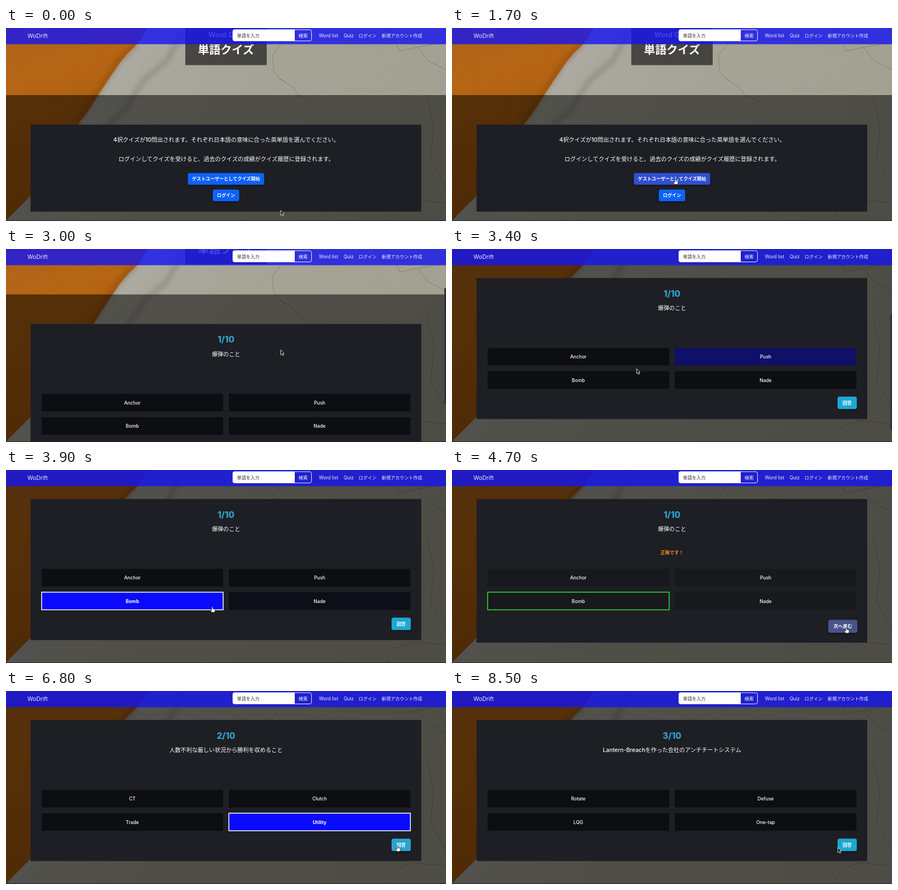
An HTML page that plays this animation: 800x351 px, repeating every 8600 ms.

```html
<!DOCTYPE html>
<html lang="ja">
<head>
<meta charset="utf-8">
<title>単語クイズ</title>
<style>
html, body { margin: 0; width: 100%; height: 100%; overflow: hidden; background: #1e1f24; }
svg { display: block; width: 800px; height: 351px; }
text { font-family: Inter, "Noto Sans CJK JP", "Noto Sans CJK", sans-serif; fill: #fff; white-space: pre; }
</style>
</head>
<body>
<svg id="stage" viewBox="0 0 800 351">
  <defs>
    <linearGradient id="stone" x1="0" y1="0" x2="1" y2="0.3">
      <stop offset="0.2" stop-color="#aeaca5"/>
      <stop offset="0.55" stop-color="#a6a496"/>
      <stop offset="1" stop-color="#a2a091"/>
    </linearGradient>
    <linearGradient id="clay" x1="0" y1="0" x2="0.25" y2="1">
      <stop offset="0" stop-color="#b0641c"/>
      <stop offset="0.3" stop-color="#b56513"/>
      <stop offset="1" stop-color="#a4580c"/>
    </linearGradient>
    <filter id="shadow" x="-20%" y="-40%" width="140%" height="200%">
      <feDropShadow dx="0" dy="2" stdDeviation="2" flood-opacity="0.35"/>
    </filter>
    <filter id="soft" x="-20%" y="-20%" width="140%" height="140%">
      <feGaussianBlur stdDeviation="5"/>
    </filter>
  </defs>

  <g id="wall">
    <rect width="800" height="351" fill="url(#stone)"/>
    <path d="M325 0L292 60 250 95 215 150 180 180" fill="none" stroke="#77756c" stroke-width="9" opacity="0.45" filter="url(#soft)"/>
    <path d="M258 0L240 28 222 45 208 62 190 88 172 115 150 150 130 176 45 305 22 328 5 345 0 351V0Z" fill="url(#clay)"/>
    <path d="M236 28L203 62 168 115 126 176" fill="none" stroke="#7a3d08" stroke-width="7" opacity="0.5" filter="url(#soft)"/>
    <g fill="none" stroke="#6f6d62" stroke-width="0.8" opacity="0.75">
      <path d="M512 0L500 30 484 50 487 78 498 92 522 108 531 121 560 135M497 92L508 99"/>
      <path d="M800 26L776 30 748 35 716 42 705 20 690 0M748 35L768 60 800 76"/>
      <path d="M690 351L708 325 740 312 800 318M765 122L778 180 772 240 800 290"/>
    </g>
  </g>

  <g id="page">
    <rect y="122" width="800" height="500" opacity="0.52"/>
    <rect x="326" y="-20" width="148" height="87.5" opacity="0.58"/>
    <g id="heading"></g>
    <g id="intro"></g>
    <g id="quiz" transform="translate(0 123)"></g>
  </g>

  <rect width="800" height="29.5" fill="rgb(20,20,240)" opacity="0.8"/>
  <g id="nav"></g>
  <rect id="scrollbar" x="797" width="3" height="211" rx="1.5" fill="#303030"/>
  <rect y="350" width="800" height="1" fill="#26262a"/>

  <g id="cursor">
    <path id="arrow" d="M0 0V9L2.1 7.1 3.6 10.3 5.2 9.6 3.8 6.5H6.4Z" fill="#111" stroke="#fff" stroke-width="0.8"/>
    <path id="hand" d="M-1 0.3Q0 -0.7 1 0.3V3.2L2.6 3.5 4.2 4 5 4.8V7.3L4 9.8H-1.2L-3.4 6.2Q-3.6 5 -2.4 5.2L-1 6.2Z" fill="#fff" stroke="#111" stroke-width="0.7"/>
  </g>
</svg>
<script>
const $ = id => document.getElementById(id);
const LOOP = 8600, SCROLL = 123;

function add(parent, tag, attrs) {
  const el = document.createElementNS($("stage").namespaceURI, tag);
  for (const key in attrs) el.setAttribute(key, attrs[key]);
  return parent.appendChild(el);
}
function set(el, attrs) {
  for (const key in attrs) el.setAttribute(key, attrs[key]);
}
function label(parent, str, x, middle, size, attrs = {}) {
  const el = add(parent, "text", {
    x, y: middle + size * 0.36, "font-size": size, "text-anchor": "middle", ...attrs
  });
  el.textContent = str;
  return el;
}
function button(parent, str, x, y, width, height, fill, size = 8.3) {
  const group = add(parent, "g", {});
  const rect = add(group, "rect", { x, y, width, height, rx: 3.5, fill, filter: "url(#shadow)" });
  label(group, str, x + width / 2, y + height / 2, size, { "font-weight": 600 });
  return { group, rect };
}

// Heading and navigation
label($("heading"), "Word Quiz", 400, 12, 12.8, { "font-weight": 600 });
label($("heading"), "単語クイズ", 400, 39.8, 20.6, { "font-weight": 700 });

const nav = $("nav");
const left = { "text-anchor": "start" };
const link = { ...left, style: "fill:#ececff" };
label(nav, "WoDrift", 39, 14.5, 10.4, link);
add(nav, "path", { d: "M525 2.6H416Q412 2.6 412 6.6V20Q412 24 416 24H525Z", fill: "#fff" });
add(nav, "path", {
  d: "M525 3.1H552Q555.5 3.1 555.5 6.6V20Q555.5 23.5 552 23.5H525", fill: "none", stroke: "#fff", "stroke-width": 0.9
});
label(nav, "単語を入力", 420, 13.6, 8.2, { ...left, style: "fill:#333" });
label(nav, "検索", 540.3, 13.6, 8.2);
label(nav, "Word list", 569, 14.3, 8.5, link);
label(nav, "Quiz", 614, 14.3, 8.5, link);
label(nav, "ログイン", 641, 14.3, 8.2, link);
label(nav, "新規アカウント作成", 683, 14.3, 8.2, link);

// Start page
const PANEL = "#1e1f24";
const intro = $("intro");
const body = { "font-weight": 500 };
add(intro, "rect", { x: 44.6, y: 175.7, width: 710.4, height: 158.3, fill: PANEL });
label(intro, "4択クイズが10問出されます。それぞれ日本語の意味に合った英単語を選んでください。", 400.5, 203, 10.4, body);
label(intro, "ログインしてクイズを受けると、過去のクイズの成績がクイズ履歴に登録されます。", 400.5, 238, 10.4, body);
const guest = button(intro, "ゲストユーザーとしてクイズ開始", 330.7, 263.7, 138.6, 21.3, "#0f62fe");
button(intro, "ログイン", 376, 293.8, 48, 21.3, "#0f62fe");

// Quiz page
const quiz = $("quiz");
const panel = add(quiz, "rect", { x: 44.6, y: 52.7, width: 710.4, fill: PANEL });
const counter = label(quiz, "", 400, 81, 15.5, { "font-weight": 800, style: "fill:#2ea3cf" });
const prompt = label(quiz, "", 400, 107.5, 10.3, { "font-weight": 500 });
const verdict = label(quiz, "", 400, 150, 8.3, { "font-weight": 700, style: "fill:#ff8a1c" });
const choices = [0, 1, 2, 3].map(i => {
  const x = i % 2 ? 404.5 : 64, y = i < 2 ? 179 : 221.5;
  return {
    rect: add(quiz, "rect", { x: x + 0.75, y: y + 0.75, width: 330, height: 32 }),
    text: label(quiz, "", x + 165.7, y + 17.2, 8.6)
  };
});
const answer = button(quiz, "回答", 701, 268.5, 35, 22.5, "#1ea8d4");
const next = button(quiz, "次へ進む", 684, 272.5, 53, 23.5, "#6c757d", 8.5);

const questions = [
  { start: 2100, pick: 2, picked: 3700, answered: 4250, correct: 2, verdict: "正解です！",
    prompt: "爆弾のこと", words: ["Anchor", "Push", "Bomb", "Nade"],
    hovers: [[1, 3050, 3250], [2, 3480, 3750], [3, 3890, 4080]] },
  { start: 5000, pick: 3, picked: 6350, answered: 6950, correct: 1, verdict: "不正解です！",
    prompt: "人数不利な厳しい状況から勝利を収めること", words: ["CT", "Clutch", "Trade", "Utility"],
    hovers: [[3, 6000, 6400]] },
  { start: 8250, pick: -1, picked: LOOP, answered: LOOP, correct: -1, verdict: "",
    prompt: "Lantern-Breachを作った会社のアンチチートシステム", words: ["Rotate", "Defuse", "LQG", "One-tap"],
    hovers: [] }
];

const pointerPath = [
  [0, 499.3, 331.5], [500, 499.3, 331.5], [1400, 406, 274.8], [2100, 406, 274.8], [2600, 499.5, 183.5],
  [3200, 499.5, 183.5], [3400, 335.7, 217.7], [3600, 262, 238], [3780, 262, 238], [4150, 713, 282],
  [4350, 713, 282], [4600, 717, 287], [5300, 717, 287], [6000, 580, 239], [6400, 580, 239],
  [6700, 712, 282], [7200, 712, 282], [7600, 716, 287], [8250, 716, 287], [8450, 701.5, 284.7], [LOOP, 701.5, 284.7]
];
const handTimes = [[1300, 2150], [3080, 3270], [3480, 5050], [5900, 8300]];

const clamp = v => Math.min(1, Math.max(0, v));
const smooth = v => (v = clamp(v), v * v * (3 - 2 * v));
const within = (t, from, to) => t >= from && t < to;
const pulse = (t, on, off, fade = 300) => clamp((t - on) / fade) * clamp(1 - (t - off) / fade);
const mix = (a, b, k) => `rgb(${a.map((v, i) => Math.round(v + (b[i] - v) * k))})`;
const show = (el, visible) => el.setAttribute("visibility", visible ? "visible" : "hidden");

function drawQuiz(t) {
  const index = questions.findLastIndex(q => t >= q.start);
  show(intro, index < 0);
  quiz.style.display = index < 0 ? "none" : "";
  if (index < 0) return;
  const q = questions[index];
  const done = t >= q.answered;
  set(panel, { height: done ? 261.3 : 256.6 });
  counter.textContent = `${index + 1}/10`;
  prompt.textContent = q.prompt;
  verdict.textContent = done ? q.verdict : "";
  choices.forEach(({ rect, text }, i) => {
    const selected = !done && i === q.pick && t >= q.picked;
    const hover = q.hovers.reduce((k, [c, on, off]) => c === i ? Math.max(k, pulse(t, on, off)) : k, 0);
    const right = done && i === q.correct;
    set(rect, {
      fill: done ? "#18191c" : selected ? "#0a0aff" : mix([13, 14, 17], [18, 18, 190], hover),
      stroke: right ? "#2be32b" : selected ? "#fff" : "none",
      "stroke-width": 1.5
    });
    text.textContent = q.words[i];
    set(text, { "font-weight": selected ? 700 : 500 });
  });
  show(answer.group, !done);
  show(next.group, done);
  const overAnswer = Math.max(pulse(t, 4100, 4300), pulse(t, 6640, 7000));
  set(answer.rect, { fill: mix([30, 168, 212], [56, 158, 200], overAnswer) });
  set(next.rect, { fill: mix([108, 117, 125], [72, 82, 138], clamp((t - q.answered) / 300)) });
}

function drawPointer(t) {
  const i = pointerPath.findLastIndex(p => t >= p[0]);
  const a = pointerPath[i], b = pointerPath[i + 1] || a;
  const k = smooth((t - a[0]) / (b[0] - a[0] || 1));
  set($("cursor"), { transform: `translate(${a[1] + (b[1] - a[1]) * k} ${a[2] + (b[2] - a[2]) * k})` });
  const hand = handTimes.some(([from, to]) => within(t, from, to)) && !within(t, 3780, 3880);
  show($("hand"), hand);
  show($("arrow"), !hand);
}

function draw(now) {
  const t = now % LOOP;
  // The view reaches the question's bottom before the pointer leaves.
  const scrolled = smooth((t - 2850) / 400);
  set($("page"), { transform: `translate(0 ${-SCROLL * scrolled})` });
  set($("scrollbar"), { y: 48 + 70 * scrolled, opacity: pulse(t, 2850, 3700, 150) });
  set(guest.rect, { fill: mix([15, 98, 254], [48, 80, 208], pulse(t, 1250, LOOP, 250)) });
  drawQuiz(t);
  drawPointer(t);
  requestAnimationFrame(() => draw(performance.now() - began));
}
const began = performance.now();
draw(0);
</script>
</body>
</html>
```
